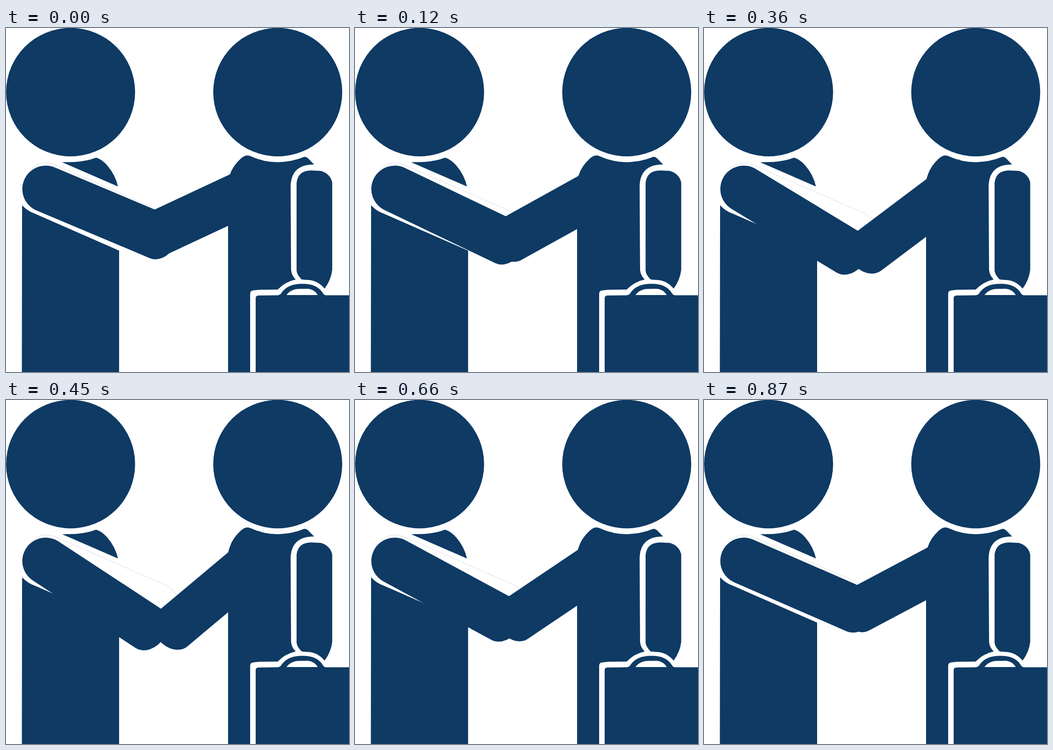
An HTML page for the animation above (0.9 s loop, 746 by 751 pixels).

```html
<!DOCTYPE html>
<html lang="en">
<head>
<meta charset="utf-8">
<title>Handshake</title>
<style>
  html, body { margin: 0; width: 100%; height: 100%; overflow: hidden; background: #fff; }
  svg { display: block; fill: #0e3a64; }
</style>
</head>
<body>
<svg width="746" height="751" viewBox="0 0 746 751">
  <!-- left figure -->
  <circle cx="140.5" cy="140" r="140.3"/>
  <path d="M122 293L150 292.5Q175 291 196 283Q209 287 221 301Q238 321 243.5 346Z"/>
  <path d="M35 387Q47 400 62 405L246 486V751H34.5Z"/>
  <path d="M36 347Q42 322 54 309Q68 295 85 294.5Q98 294 110 300L345 403Q364 410 371 430" fill="none" stroke="#d9dee3"/>

  <!-- right figure -->
  <circle cx="591" cy="140" r="140.3"/>
  <path d="M483 751V334Q484 328 487 320Q493 301 512 284Q521 276 530 279Q560 293 591 293Q623 292 648 281.5Q652 280 657 284.5L670 298Q655 298 646 301.5Q620 311 619 345L620 528Q621 540 630 549Q607 554 591 571L550 571.5L537 573Q531 574 531 580V751Z"/>
  <path d="M632 338Q635 311 664 311L685 312Q705 318 709.5 337V528Q707 550 693 569Q677 550 655 550L643 549Q633 539 632 530Z"/>
  <path fill-rule="evenodd" d="M543 751V590Q543 584 549 584L590 583.5Q597 583 600 577Q614 558 645 558.5Q675 558 688 577Q691 583 696 583.5H746V751ZM610 583Q620 569 640 569.5H650Q669 568 678 583Z"/>

  <!-- arms, drawn around their shoulder joints -->
  <path id="leftArm" d="M0 -51H267A40 51 0 0 1 267 51H0A51 51 0 0 1 0 -51Z"/>
  <path id="rightArm" d="M30 -50L50 -41V0A50 50 0 0 1 0 50H-232A39 50 0 0 1 -232 -50Z"/>
</svg>
<script>
  const STEP = 30, COUNT = 30, PEAK = 15;
  const leftArm = document.getElementById('leftArm');
  const rightArm = document.getElementById('rightArm');

  const place = (arm, x, y, angle) =>
    arm.setAttribute('transform', `translate(${x} ${y}) rotate(${angle})`);

  // Linear swing from start to peak and on to end, in whole steps
  const swing = (n, start, peak, end) => n < PEAK
    ? start + (peak - start) * n / PEAK
    : peak + (end - peak) * (n - PEAK) / (COUNT - PEAK);

  function draw(now) {
    const n = Math.floor(now / STEP) % COUNT;
    place(leftArm, 86.5, 351.5, swing(n, 22.9, 33.4, 22.9));
    place(rightArm, 540, 350, -swing(n, 25.1, 40.1, 27.2));
    requestAnimationFrame(draw);
  }
  draw(0);
</script>
</body>
</html>
```
